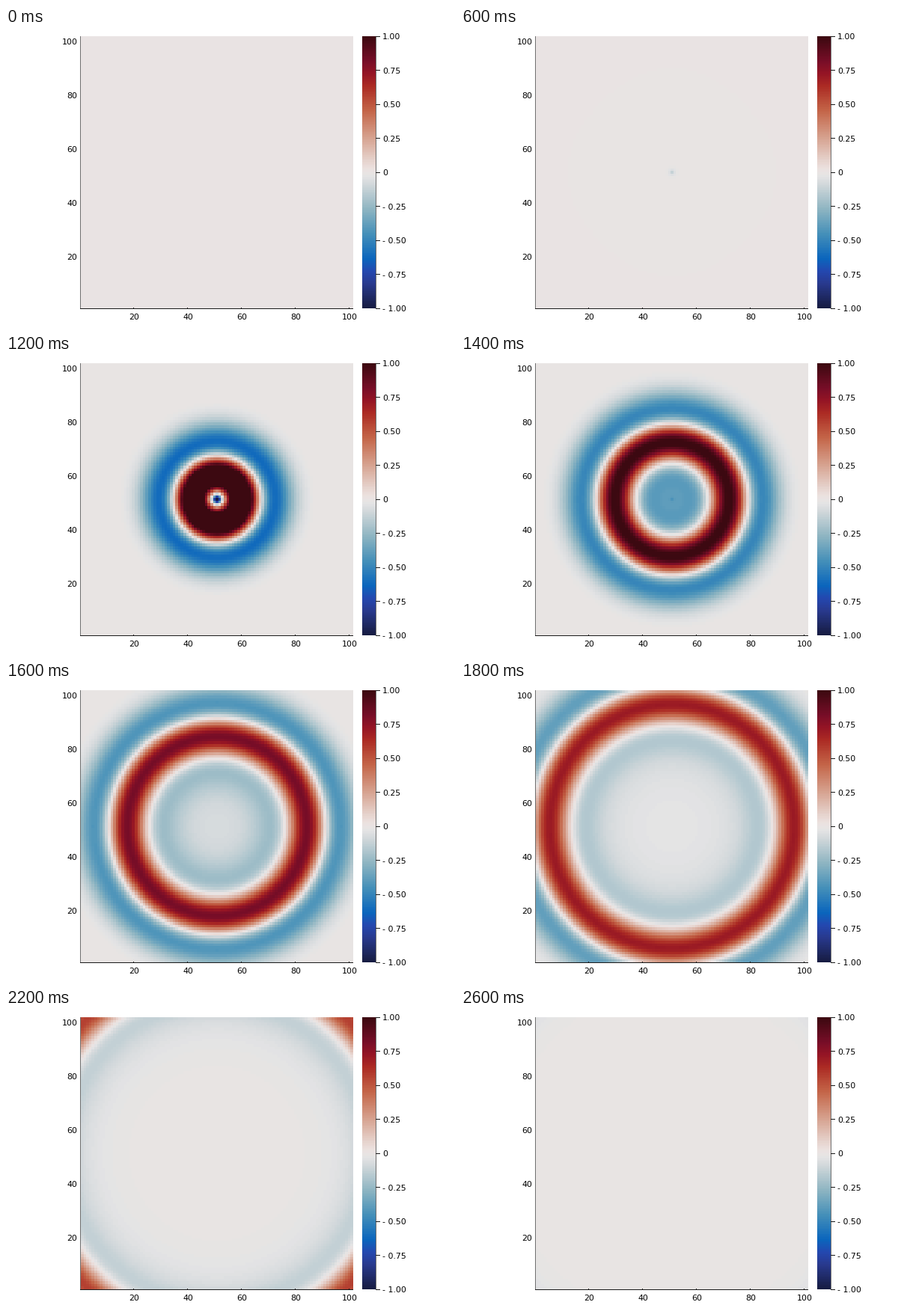
Write a matplotlib script that moves like this. It is 600 px wide and 400 px high and loops after 5 s.

```python
import math

import numpy as np
import matplotlib.pyplot as plt
from matplotlib.animation import FuncAnimation
from matplotlib.colors import LinearSegmentedColormap

WIDTH, HEIGHT, DPI = 600, 400, 100
FRAMES, INTERVAL = 100, 50
FIRST, LAST = 12, 52          # frames between which the wave is visible
CELLS, PAD = 101, 60          # padding keeps edge echoes out of view
STEPS = 5                     # solver steps per frame
COURANT = 0.6
LEFT, RIGHT, TOP, BOTTOM = 100, 464, 11, 375
BAR_LEFT, BAR_RIGHT = 476, 494
INK, SOFT_INK = "#1a1a1a", "#707070"

STOPS = [
    (0, (23, 28, 66)), (1 / 11, (41, 58, 143)), (0.135, (36, 72, 176)),
    (2 / 11, (11, 102, 189)), (3 / 11, (69, 144, 185)),
    (4 / 11, (142, 181, 194)), (5 / 11, (210, 216, 219)),
    (0.485, (228, 228, 229)), (0.493, (232, 228, 227)),
    (0.5, (233, 228, 228)), (0.515, (236, 225, 222)),
    (6 / 11, (230, 210, 204)), (7 / 11, (213, 157, 137)),
    (8 / 11, (196, 101, 72)), (9 / 11, (172, 43, 36)),
    (0.864, (149, 21, 37)), (10 / 11, (120, 14, 40)), (1, (60, 9, 17)),
]
CMAP = LinearSegmentedColormap.from_list(
    "diverging", [(p, tuple(c / 255 for c in rgb)) for p, rgb in STOPS], N=256)


def ricker(t, freq=0.1, peak=20):
    a = (np.pi * freq * (t - peak)) ** 2
    return (1 - 2 * a) * np.exp(-a)


def simulate():
    """Wave equation with a point source in the middle of the grid."""
    size = CELLS + 2 * PAD
    mid = size // 2
    view = slice(PAD, PAD + CELLS)
    old, now = np.zeros((size, size)), np.zeros((size, size))
    fields = []
    for step in range(LAST * STEPS + 1):
        lap = np.zeros_like(now)
        lap[1:-1, 1:-1] = (now[2:, 1:-1] + now[:-2, 1:-1] + now[1:-1, 2:]
                           + now[1:-1, :-2] - 4 * now[1:-1, 1:-1])
        new = 2 * now - old + COURANT ** 2 * lap
        new[mid, mid] += 4 * ricker(step / STEPS)
        old, now = now, new
        if step % STEPS == 0:
            quiet = step < FIRST * STEPS
            fields.append(now[view, view] * (not quiet))
    return fields


fields = simulate()

fig = plt.figure(figsize=(WIDTH / DPI, HEIGHT / DPI), dpi=DPI, facecolor="white")
ax = fig.add_axes([0, 0, 1, 1])
ax.axis("off")


def show(data, extent):
    return ax.imshow(data, cmap=CMAP, vmin=-1, vmax=1, extent=extent,
                     origin="lower", interpolation="nearest", aspect="auto")


def line(x0, y0, x1, y1, color=INK):
    ax.plot([x0, x1], [y0, y1], color=color, lw=72 / DPI,
            solid_capstyle="butt", snap=False)


def pixel(v):
    return math.floor(v) + 0.5


def label(x, y, text, align):
    ax.text(x, y + 4, text, ha=align, va="baseline", color="black",
            family="DejaVu Sans", size=11 * 72 / DPI)


heat = show(fields[0], (LEFT, RIGHT, BOTTOM, TOP))
show(np.linspace(-1, 1, 256)[:, None], (BAR_LEFT, BAR_RIGHT, BOTTOM, TOP))

line(LEFT - 0.5, TOP, LEFT - 0.5, BOTTOM, SOFT_INK)
line(LEFT - 1, BOTTOM + 0.5, RIGHT, BOTTOM + 0.5)
cell = (RIGHT - LEFT) / CELLS
for value in range(20, 101, 20):
    offset = (value - 0.5) * cell
    x = pixel(LEFT + offset)
    line(x, BOTTOM, x, BOTTOM - 1)
    label(LEFT + offset + 0.7, 386, str(value), "center")
    label(95.3, BOTTOM - offset + 1.4, str(value), "right")

line(BAR_RIGHT + 0.5, TOP, BAR_RIGHT + 0.5, BOTTOM + 1, SOFT_INK)
for value in np.linspace(-1, 1, 9):
    y = (TOP + BOTTOM) / 2 - value * (BOTTOM - TOP) / 2
    line(BAR_RIGHT, pixel(y), BAR_RIGHT + 6, pixel(y))
    text = f"{abs(value):.2f}" if value else "0"
    label(502.9, y + 0.3, "- " + text if value < 0 else text, "left")

ax.set_xlim(0, WIDTH)
ax.set_ylim(HEIGHT, 0)


def draw(frame):
    heat.set_data(fields[min(frame, LAST)])
    return (heat,)


animation = FuncAnimation(fig, draw, frames=FRAMES, interval=INTERVAL,
                          repeat=True, repeat_delay=0, blit=False)
plt.show()
```
